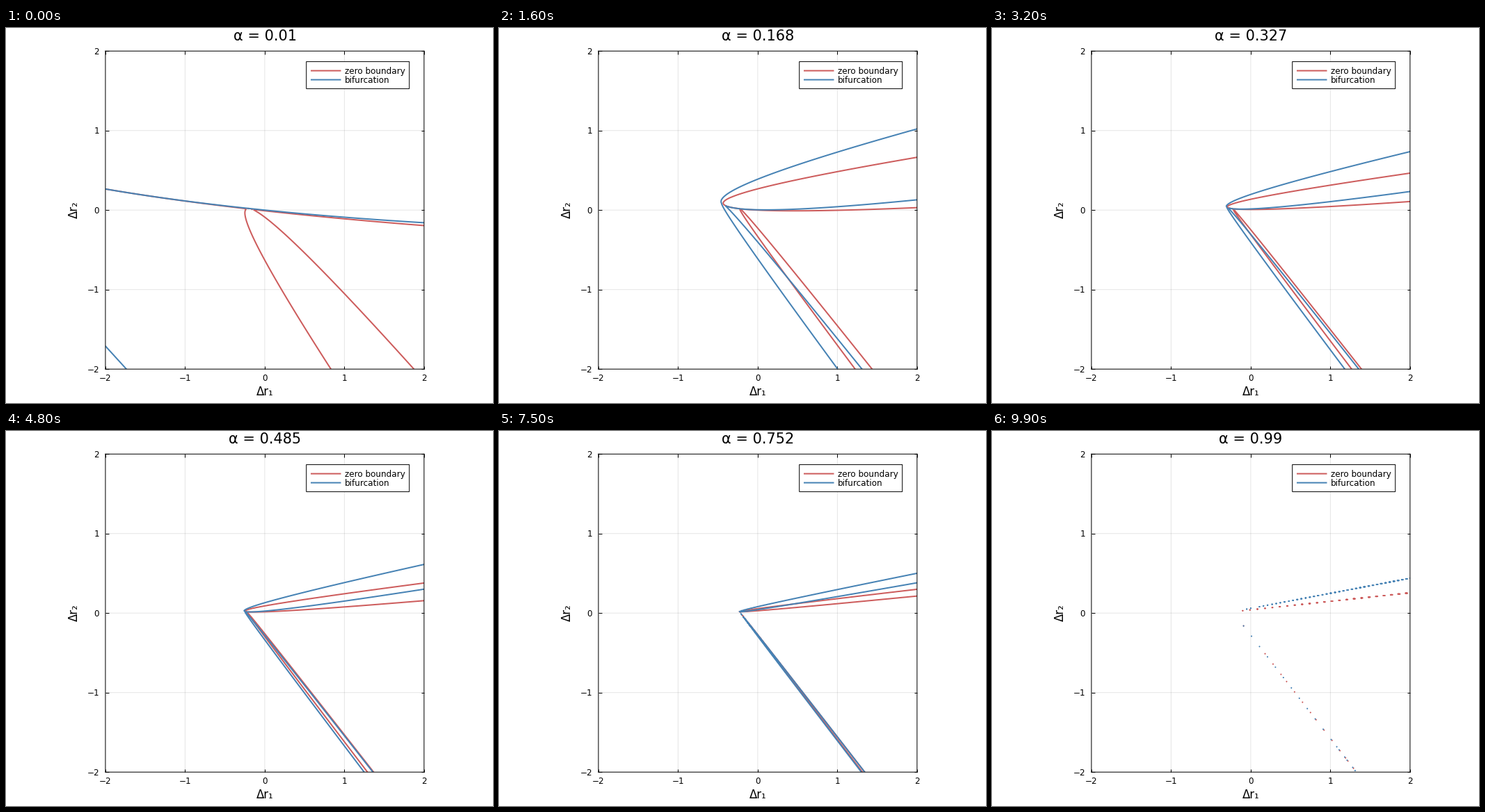
Animation, 700 px wide and 540 px high, one loop 10 s. Source, as a matplotlib script:

```python
import numpy as np
import matplotlib.pyplot as plt
from matplotlib.animation import FuncAnimation
from matplotlib.collections import LineCollection
from matplotlib.patches import Rectangle
from matplotlib.transforms import Affine2D

W, H, DPI = 700, 540, 100
FRAMES, INTERVAL = 100, 100
RED, BLUE = "#CD5C5C", "#4682B4"
LEFT, RIGHT, TOP, BOTTOM = 142.9, 600.9, 33.2, 491.2

plt.rcParams["font.family"] = "DejaVu Sans"
plt.rcParams["path.simplify"] = False
plt.rcParams["path.snap"] = False

# Quadratic system with weights (1 - alpha) on linear and alpha on
# second-order terms, written in the basis of its pure quadratic directions:
#   X = t1^2 + L t1 t2 + k (A1 t1 + A2 t2)
#   Y = t2^2 + M t1 t2 + k (B1 t1 + B2 t2),   k = (1 - alpha) / sqrt(alpha)
A1, A2, L = 0.3787, 0.0342, -0.071
B1, B2, M = 0.0925, -0.0093, -0.531
SLOPE, LEAN = 0.107, 0.7708
ORIGIN = (-0.2261, 0.0167)

axis = np.linspace(-2, 2, 401)
GX, GY = np.meshgrid(axis, axis)
DX, DY = GX - ORIGIN[0], GY - ORIGIN[1]
X = (DX + LEAN * DY) / (1 + LEAN * SLOPE)
Y = SLOPE * X - DY


def zero_boundary(k):
    """Vanishes where a solution has t1 = 0 or t2 = 0."""
    a1, a2, b1, b2 = k * A1, k * A2, k * B1, k * B2
    return (Y * (Y + a1 * b1) - b1 * b1 * X) * (X * (X + a2 * b2) - a2 * a2 * Y)


def bifurcation(k):
    """Discriminant of the quartic in t2 left after eliminating t1."""
    a1, a2, b1, b2 = k * A1, k * A2, k * B1, k * B2
    g0, g1, g2 = b1 * a1, b1 * L + M * a1, L * M
    a = 1 - g2
    b = 2 * b2 - g1 - b2 * g2 + M * M * a2
    c = b2 * b2 - g0 - b2 * g1 + 2 * b1 * M * a2 + (g2 - 2) * Y - M * M * X
    d = b1 * b1 * a2 - b2 * g0 + (g1 - 2 * b2) * Y - 2 * b1 * M * X
    e = Y * (Y + g0) - b1 * b1 * X
    cc = c * c
    i = 12 * a * e - 3 * b * d + cc
    j = c * (72 * a * e + 9 * b * d - 2 * cc) - 27 * (a * d * d + b * b * e)
    # Elimination adds a squared factor on the line where b1 + M t2 = 0.
    t = -b1 / M
    extra = Y - t * (t + b2)
    return (4 * i * i * i - j * j) / (extra * extra + 1e-12)


def pt(px):
    return px * 72 / DPI


fig = plt.figure(figsize=(W / DPI, H / DPI), dpi=DPI, facecolor="white")


def label(x, y, s, px, ha="center", **kw):
    return fig.text(x / W, 1 - y / H, s, fontsize=pt(px), ha=ha, va="baseline", **kw)


ax = fig.add_axes([LEFT / W, 1 - BOTTOM / H, (RIGHT - LEFT) / W, (BOTTOM - TOP) / H])
ax.set(xlim=(-2, 2), ylim=(-2, 2), autoscale_on=False)
ticks = range(-2, 3)
ax.set_xticks(ticks)
ax.set_yticks(ticks)
ax.tick_params(direction="in", length=pt(4.5), width=pt(1), top=True, right=True,
               labelleft=False, labelbottom=False)
ax.grid(color="black", alpha=0.1, linewidth=pt(1))
ax.set_axisbelow(True)
for spine in ax.spines.values():
    spine.set_linewidth(pt(1))

for v in ticks:
    name = str(v).replace("-", "\u2212")
    label(LEFT + (v + 2) / 4 * (RIGHT - LEFT), 508, name, 12)
    label(134, BOTTOM - (v + 2) / 4 * (BOTTOM - TOP) + 4.4, name, 12, ha="right")

label(372, 529, "Δr₁", 16.5)
label(103, 262, "Δr₂", 16.5, rotation=90, rotation_mode="anchor")
title = label(372, 18.5, "", 20.9)

# Legend, placed in stage pixels
to_px = Affine2D().scale(1 / W, -1 / H).translate(0, 1) + fig.transFigure
fig.add_artist(Rectangle((431.7, 48.4), 148, 39, facecolor="white", edgecolor="black",
                         linewidth=pt(1), transform=to_px, zorder=5))
for y, color, name in ((61.5, RED, "zero boundary"), (74.5, BLUE, "bifurcation")):
    fig.add_artist(plt.Line2D([438, 481.5], [y, y], color=color, linewidth=pt(2),
                              solid_capstyle="butt", transform=to_px, zorder=6))
    label(487, y + 4.5, name, 12, ha="left", zorder=6)


def curve(color, z):
    # Round caps keep the tiny loops around single grid nodes visible as dots.
    lines = LineCollection([], colors=color, linewidths=pt(2), zorder=z,
                           capstyle="round", joinstyle="round")
    return ax.add_collection(lines, autolim=False)


curves = [(zero_boundary, curve(RED, 2.1)), (bifurcation, curve(BLUE, 2.2))]


def draw(n):
    alpha = 0.01 + 0.98 * n / (FRAMES - 1)
    k = (1 - alpha) / np.sqrt(alpha)
    for f, lines in curves:
        cs = ax.contour(axis, axis, f(k), levels=[0])
        lines.set_segments(cs.allsegs[0])
        cs.remove()
    title.set_text(f"α = {round(alpha, 3)}")
    return [title]


anim = FuncAnimation(fig, draw, frames=FRAMES, interval=INTERVAL,
                     init_func=lambda: [], repeat=True, repeat_delay=0)
plt.show()
```
